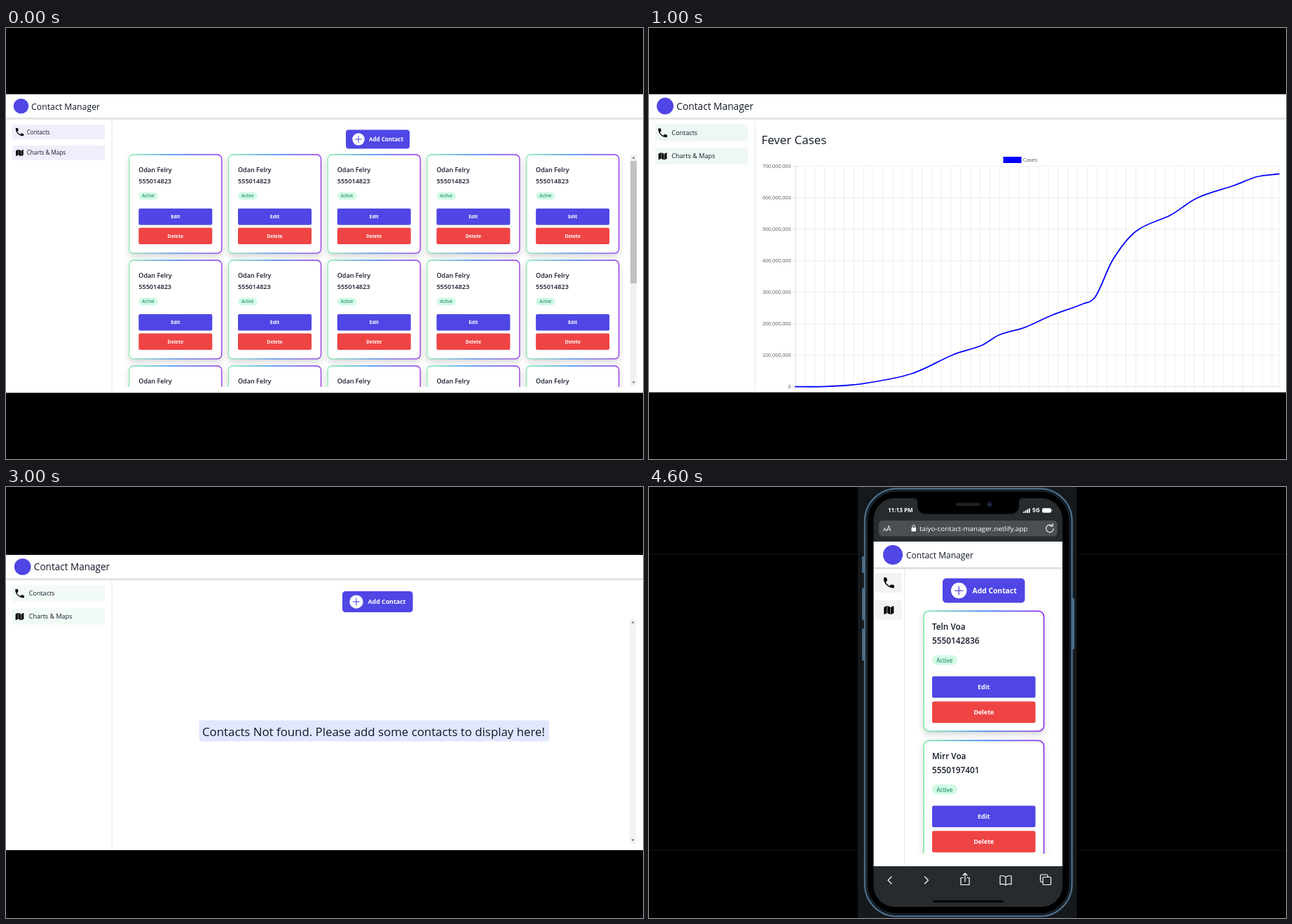
Recreate the animation shown at these times as an HTML page. Size 909 by 616 pixels, loop 5000 ms.

```html
<!DOCTYPE html>
<html lang="en">
<head>
<meta charset="utf-8">
<title>Contact Manager</title>
<style>
html, body { margin: 0; width: 100%; height: 100%; overflow: hidden; background: #000; }
#stage { display: block; width: 100%; height: 100%; }
text { font-family: "Open Sans", "Noto Sans", sans-serif; white-space: pre; }
.arial { font-family: "Liberation Sans", Arial, sans-serif; }
.place { font-family: "Noto Sans", "Noto Sans CJK SC", "DejaVu Sans", sans-serif;
  stroke: #fff; stroke-opacity: .7; stroke-width: 1.2px; paint-order: stroke; text-anchor: middle; }
.line { fill: none; stroke-linecap: round; stroke-linejoin: round; }
.card { filter: drop-shadow(0 4px 4px rgba(0, 0, 0, .16)); }
.popup { filter: drop-shadow(0 2px 4px rgba(0, 0, 0, .4)); }
</style>
</head>
<body>
<svg id="stage" viewBox="0 0 909 616">
  <defs>
    <linearGradient id="rim">
      <stop stop-color="#86efac"/><stop offset=".5" stop-color="#3b82f6"/><stop offset="1" stop-color="#9333ea"/>
    </linearGradient>
    <linearGradient id="shade" x2="0" y2="1">
      <stop stop-opacity=".2"/><stop offset="1" stop-opacity="0"/>
    </linearGradient>
    <path id="phone" d="M-5.4-1.2c1.4 2.8 3.8 5.1 6.600 6.600l2.200-2.200q.5-.4 1-.2 1.700.6 3.600.6 1 0 1 1V8q0 1-1 1A17 17 0 0 1-9-8q0-1 1-1h3.500q1 0 1 1 0 1.900.6 3.600.1.500-.3 1z"/>
    <path id="folded" d="M-10-6-4-9V6L-10 9ZM-3-9 3-6V9L-3 6ZM4-6 10-9V6L4 9Z"/>
    <g id="pin">
      <path d="M0 16.500 10 5Q16 0 13 6Q10 12 0 16.500Z" fill="#000" opacity=".2"/>
      <path d="M0 16.500C-1.500 10-7.200 5.500-7.200-.5A7.200 7.200 0 0 1 7.200-.5C7.200 5.500 1.500 10 0 16.500Z" fill="#2a81cb" stroke="#2e6c97" stroke-width=".6"/>
      <circle r="2.600" fill="#fff"/>
    </g>
  </defs>
</svg>
<script>
const INDIGO = '#4f46e5', INK = '#111827', LAND = '#f2efe9', SEA = '#aad3df';
const rect = (x, y, w, h, fill, r = 0, more = '') =>
  `<rect x="${x}" y="${y}" width="${w}" height="${h}" fill="${fill}" rx="${r}" ${more}/>`;
const disc = (x, y, r, fill) => `<circle cx="${x}" cy="${y}" r="${r}" fill="${fill}"/>`;
const text = (x, y, size, str, fill = INK, more = '') =>
  `<text x="${x}" y="${y}" font-size="${size}" fill="${fill}" ${more}>${str}</text>`;
const line = (d, stroke, w = 1) => `<path class="line" d="${d}" stroke="${stroke}" stroke-width="${w}"/>`;
const clip = (x, y, w, h, body) =>
  `<svg x="${x}" y="${y}" width="${w}" height="${h}" viewBox="${x} ${y} ${w} ${h}">${body}</svg>`;
const icon = (id, x, y, s) => `<use href="#${id}" transform="translate(${x} ${y}) scale(${s})"/>`;
const group = (x, y, s, body) => `<g transform="translate(${x} ${y}) scale(${s})">${body}</g>`;
const pairs = s => s.trim().split(/\s+/).map(p => p.split(',').map(Number));
const range = n => [...Array(n).keys()];
const bold = 'font-weight="700" ', semi = 'font-weight="600"', mid = 'text-anchor="middle"';

// Page frame at zoom s: header, two menu items and the sidebar edge
function shell(top, bottom, s, cx, tint) {
  const h = 21.2 * s, edge = top + 34;
  const item = (y, id, size, label) => rect(8.7, y, 132.5, h, tint, 3) +
    icon(id, 19.5, y + h / 2, size * s) + text(cx + 8.2 * s, y + h / 2 + 2.9 * s, 8.15 * s, label);
  return rect(0, top, 909, bottom - top, '#fff') + rect(0, edge, 909, 3, 'url(#shade)') +
    disc(cx, top + 17, 10.7 * s, INDIGO) + text(cx + 14.6 * s, top + 17 + 4.9 * s, 12.25 * s, 'Contact Manager') +
    item(top + 43.5, 'phone', .63, 'Contacts') + item(top + 43.5 + 29.7 * s, 'folded', .53, 'Charts &amp; Maps') +
    rect(150.6, edge + 1, 1, bottom - edge - 1, '#e5e7eb');
}

const addButton = (x, y, s) => group(x, y, s, rect(0, 0, 91, 27.2, INDIGO, 4) +
  disc(18, 13.6, 8.7, '#fff') + line('M13.5 13.6h9M18 9.1v9', INDIGO) +
  text(33, 16.6, 8, 'Add Contact', '#fff', bold));

function card(x, y, w, h, s, dx, dy, name, number) {
  const bw = (w - 2 * dx) / s;
  const button = (by, fill, label) => rect(0, by, bw, 23.5, fill, 2) +
    text(bw / 2, by + 14, 6.9, label, '#fff', bold + mid);
  return rect(x, y, w, h, '#fff', 6 * s, `class="card" stroke="url(#rim)" stroke-width="${1.3 * s}"`) +
    group(x + dx, y + dy, s, text(0, 0, 9.05, name, INK, semi) + text(0, 16, 9.1, number, INK, semi) +
      rect(0, 28.3, 27.6, 11, '#d1fae5', 5.5) + text(13.8, 36.2, 6.3, 'Active', '#047857', mid) +
      button(51.6, INDIGO, 'Edit') + button(79.3, '#ef4444', 'Delete'));
}

const scrollbar = (x, y, h, track) => rect(x, y, 9.5, h, track) +
  `<path d="M${x + 2.6} ${y + 6}h4.4l-2.2-2.6ZM${x + 2.6} ${y + h - 6}h4.4l-2.2 2.6Z" fill="#666"/>`;

function contacts() {
  const cards = range(15).map(i => card(175.8 + i % 5 * 141.7, 181 + Math.floor(i / 5) * 151,
    132, 140.8, 1, 13.5, 25.3, 'Odan Felry', '555014823')).join('');
  return shell(94.6, 521.4, 1, 21.5, '#f1edfb') + addButton(485, 145.4, 1) + clip(152, 176, 738, 337, cards) +
    scrollbar(890.7, 180.5, 331, '#f1f1f1') + rect(891, 190, 9, 175, '#c1c1c1');
}

// Chart of total cases: a smooth curve through its turning points
const totals = pairs(`209,512.7 250,512.4 303,508.6 375,494 435,466.5 475,453.5 500,438.5 535,428.4 575,410.5
  620,394 637,384 662,331 695,290.5 745,267 782,243 835,225 868,212.5 899,208.5`);

function smooth(pts) {
  const slope = i => {
    const a = pts[Math.max(0, i - 1)], b = pts[Math.min(pts.length - 1, i + 1)];
    return (b[1] - a[1]) / (b[0] - a[0]);
  };
  return 'M' + pts[0] + pts.slice(1).map(([x, y], i) => {
    const [px, py] = pts[i], d = (x - px) / 3;
    return `C${px + d} ${py + d * slope(i)} ${x - d} ${y - d * slope(i + 1)} ${x} ${y}`;
  }).join('');
}

function chart() {
  const grid = (d, first) => line(d, first ? '#d4d4d4' : '#e9e9e9', .8);
  const label = (x, y, str, more = '') =>
    text(x, y, 7.3, str, '#666', `class="arial" text-anchor="end" ${more}`);
  const rows = range(8).map(i => {
    const y = 512.7 - i * 45.02;
    return grid(`M204 ${y}H899`, !i) + label(202.5, y + 2.5, (i * 1e8).toLocaleString('en-US'));
  }).join('');
  const days = range(50).map(i => {
    const x = 209 + i * 13.88, day = new Date(Date.UTC(2020, 0, 22 + 23 * i));
    const date = [day.getUTCMonth() + 1, day.getUTCDate(), day.getUTCFullYear() % 100].join('/');
    return grid(`M${x} 197.5V517.5`, !i) + label(x + 2.5, 524.5, date, `transform="rotate(-50 ${x + 2.5} 524.5)"`);
  }).join('');
  return rows + days + grid('M899 197.5V513') + line(smooth(totals), '#00f', 1.8);
}

const charts = () => clip(0, 94, 909, 427, shell(94.6, 520.7, 1.12, 23, '#eef7f3') +
  text(160.5, 165.6, 16.9, 'Fever Cases') + rect(505.5, 184, 26, 9, '#00f') +
  text(533.7, 190.6, 7.2, 'Cases', '#666', 'class="arial"') + chart());

// Rough coasts as lon,lat in Mercator
const project = ([lon, lat]) => [319.9 + 3.41 * lon,
  429.6 - 195.4 * Math.log(Math.tan(Math.PI / 4 + lat * Math.PI / 360))].map(v => v.toFixed(1));
const trace = s => 'M' + pairs(s).map(project).join('L');

const mainlands = [
  `-9,37 -9,43 -1.5,43.5 -4.5,48.4 4,52 8,54 141,54 140,48 128,40 129,35 126,35 124,40 118,39 122,37 119,35 122,30
   116,23 106,20 109,12 105,9 101,13 100,7 104,1 98,9 97,16.5 91,22.5 87,21 80,15 77.5,8 73,20 67,25 57,26.5 48.5,30
   51.5,25 59.8,22.5 52,15.6 43.5,12.8 35,28.5 36,36.5 27,37 23.5,40 22.8,36.5 19.4,41 13.5,45.5 18.4,40 16,38
   8.5,44.3 3,43 -.5,38.5 -5.5,36`,
  `-6,35.8 10,37.2 11,33.5 20,31 36,31 34,27 39.5,15.5 43.5,11 51.2,11.8 42,-1 40.5,-15 35,-20 35,-26 14,-26
   13.5,-12 9,-1 9.5,4 4,6.2 -8,4.4 -17,14 -17,21 -10,30`,
  '113,-24 122,-18 129,-14.5 136,-12 136,-16 140,-17.5 142,-11 146,-19 151,-24',
  '-48,-1 -35,-6 -39,-14 -40,-26 -48,-26'
];
// Islands and inland seas are thick strokes, grouped by width
const islands = {
  5: ['142.5,47 142.5,53', '106,-7 114,-8', '9,39 9,42', '13,37.5 15,37.5', '121,23 121,24.5', '122,-9 126,-9'],
  7: ['131,32.5 136,35 140,36.5 143,43.5', '121,17 122,13 125,8', '120,-4 120.5,0 124,1', '80.7,7 81,7.6'],
  11: ['97,4 104,-4', '133,-2 140,-6 148,-9', '-4,51 0,53'],
  14: ['48,-15 46,-22'],
  22: ['112,0 116,4']
};
const seas = ['31,43.5 39,42.5', '50,44.5 52,39'];

// Pin clusters: x, y, radii and count, spread by the golden angle
const clusters = [[368, 250, 68, 42, 34], [350, 335, 75, 32, 8], [303, 398, 34, 18, 16], [378, 415, 32, 32, 11],
  [458, 415, 42, 42, 13], [450, 496, 75, 20, 12], [480, 317, 42, 42, 16], [690, 366, 56, 28, 10],
  [722, 441, 42, 26, 5], [887, 442, 28, 50, 5]];
const spread = ([x, y, rx, ry, n]) => range(n).map(i => {
  const r = ((i + .5) / n) ** .6, a = i * 2.4;
  return [x + rx * r * Math.cos(a), y + ry * r * Math.sin(a)].map(Math.round);
});
const lone = pairs(`246,381 309,491 328,436 518,452 560,250 577,425 590,367 604,412 686,261 686,309
  761,287 763,300 798,305 786,410 829,457`);
const pins = [...clusters.flatMap(spread), ...lone].sort((a, b) => a[1] - b[1]);

const places = `355,228,Deutschland 310,283,España 441,286,Türkiye 547,245,Қазақстан 520,287,Türkmenistan
  681,240,Монгол 657,301,中国 792,301,日本 322,331,Algérie 318,370,Mali 354,370,Niger 423,337,مصر
  690,376,Việt&#160;Nam 738,385,Philippines 723,416,Malaysia 730,439,Indonesia 823,452,Papua&#160;Niugini
  420,404,South&#160;Sudan 397,445,démocratique 385,472,Angola`.split(/\s+/).map(p => p.split(','));

function map() {
  const land = mainlands.map(s => `<path d="${trace(s)}Z" fill="${LAND}" stroke="${LAND}" stroke-linejoin="round" stroke-width="2"/>`).join('') +
    Object.entries(islands).flatMap(([w, list]) => list.map(s => line(trace(s), LAND, w))).join('') +
    seas.map(s => line(trace(s), SEA, 13)).join('');
  const popup = `<g class="popup"><path d="M574 350h18l-9 7.500Z" fill="#fff"/>${rect(530.5, 261.5, 104.5, 89.8, '#fff', 7)}</g>` +
    ['India', 'Active Cases: 1475', 'Recovered: 44463331', 'Deaths: 531926'].map((s, i) =>
      text(543, 277.3 + i * 20.4, 7.75, s, '#333', 'class="arial"')).join('') +
    line('M625.8 267.2l4 4m0-4l-4 4', '#757575', .9);
  const zoom = rect(167.5, 219.5, 19.5, 36.5, '#fff', 2, 'stroke="#000" stroke-opacity=".22"') +
    line('M168 237.8h18.5', '#ccc', .7) + line('M174 229h7M177.5 225.5v7M174 247h7', '#111', 1.3);
  const link = s => `<tspan fill="#0078a8">${s}</tspan>`;
  const credit = rect(760.5, 502.5, 140, 10.5, '#ffffffcc') +
    rect(763.3, 504.8, 7.2, 2.6, '#4c7be1') + rect(763.3, 507.4, 7.2, 2.6, '#ffd500') +
    text(772, 510, 7.2, `${link('Leaflet')} | © ${link('OpenStreetMap')} contributors`, '#333', 'class="arial"');
  return clip(161.5, 213, 738.5, 299.5, rect(161, 213, 740, 300, SEA) + land +
    places.map(([x, y, s]) => text(x, y, 6.2, s, '#86709a', 'class="place"')).join('') +
    pins.map(([x, y]) => icon('pin', x, y, 1)).join('') + popup + zoom + credit);
}

const maps = () => clip(0, 95, 909, 425, rect(0, 95, 909, 425, '#fff') +
  rect(150.7, 95, 1, 425, '#e5e7eb') + group(1, -375.6, 1, chart()) + text(161, 200, 17.1, 'Map') + map());

const empty = () => shell(97, 519, 1.107, 23.7, '#f2faf5') +
  addButton(480, 149, 1.105) + rect(275.5, 333.5, 499.5, 30, '#e0e7ff', 3) +
  text(280, 355.5, 16.83, 'Contacts Not found. Please add some contacts to display here!') +
  scrollbar(889.7, 188.5, 321, '#f3f3f0');

function mobile() {
  const steel = '#4b6c87', white = (d, w = 1.2) => line(d, '#fff', w);
  const entry = (y, name, number) => card(392, y, 171.5, 171.7, 1.3, 12, 26.2, name, number);
  const key = (x, y, h) => rect(x, y, 3, h, steel, 1);
  const body = rect(298, 0, 312.5, 616, '#15191c') +
    key(304, 99, 24) + key(304, 144, 46) + key(304, 202, 46) + key(604, 159, 73) +
    rect(308, 2.5, 295.5, 611, '#000', 46, `stroke="${steel}" stroke-width="2.5"`) +
    rect(311, 5.5, 289.5, 605, 'none', 43, 'stroke="#1b2730" stroke-width="2"') +
    rect(320.5, 16, 269.5, 584, '#262b2f', 30) +
    '<path d="M377 15.500q6 .5 6 6v4q0 13 13 13h119q13 0 13-13v-4q0-5.500 6-6Z"/>' +
    rect(438, 22.6, 34, 4.4, '#1f2123', 2.2) + disc(486, 25, 4.2, '#11162a') + disc(486, 25, 1.5, '#33446c');
  const status = text(341, 36, 8.1, '11:13 PM', '#fff', bold) +
    range(4).map(i => rect(534 + i * 2.6, 35 - i * 1.5, 1.9, 2 + i * 1.5, '#fff', .5)).join('') +
    text(547, 36.3, 8.3, '5G', '#fff', bold) + rect(561, 30.3, 13, 6.5, '#fff', 2) + rect(574.6, 32.3, 1, 2.5, '#aaa');
  const address = rect(328, 48, 254.5, 22.5, '#4b4f53', 5) + text(334, 62.5, 8, 'A', '#fff') + text(339, 62.5, 10, 'A', '#fff') +
    rect(374.5, 58, 6.5, 5.5, '#fff', 1) + white('M376 58v-1.5a1.8 1.8 0 0 1 3.6 0V58', 1) +
    text(386, 62.6, 9.85, 'taiyo-contact-manager.netlify.app', '#fff') +
    white('M575.6 55.6A5.3 5.3 0 1 0 577.2 59.5M572.2 56h3.9v-3.6', 1.1);
  const page = rect(320.5, 78, 269.5, 464, '#fff') + rect(320.5, 115, 269.5, 3.5, 'url(#shade)') +
    disc(348, 97, 14, INDIGO) + text(367, 101.6, 12, 'Contact Manager') + rect(364, 118, 1, 424, '#e5e7eb') +
    rect(323, 123, 38, 28, '#f3f3f4', 3) + rect(323, 162, 38, 28, '#f3f3f4', 3) +
    icon('phone', 342.3, 137, .83) + icon('folded', 342.3, 176, .7) +
    clip(320.5, 78, 269.5, 446, addButton(419, 130.5, 1.29) +
      entry(177.3, 'Teln Voa', '5550142836') + entry(362.3, 'Mirr Voa', '5550197401'));
  const tools = white('M346 557l-5 5 5 5M393.5 557l5 5-5 5') +
    white('M448 558.5h-3v10h12v-10h-3M451 564v-11.5M448 555l3-3 3 3') +
    white('M509 557.5q-4-3-8-1.5v12q4-1.5 8 1 4-2.5 8-1v-12q-4-1.5-8 1.5v11.5') +
    white('M561.5 564.5h-1.5q-1.5 0-1.5-1.5v-7.5q0-1.5 1.5-1.5h7.5q1.5 0 1.5 1.5v1') +
    rect(562, 557.5, 11.5, 11, 'none', 1.5, 'stroke="#fff" stroke-width="1.2"') + rect(405, 590.7, 101, 2.8, '#000', 1.4);
  return rect(0, 95.5, 909, 1, '#15151c') + rect(0, 518.7, 909, 1, '#131316') + body + status + address + page + tools;
}

const stage = document.getElementById('stage');
stage.insertAdjacentHTML('beforeend',
  [contacts, charts, maps, empty, mobile].map(scene => `<g class="scene">${scene()}</g>`).join(''));
const scenes = stage.querySelectorAll('.scene');

function draw() {
  const now = Math.floor(performance.now() % 5000 / 1000);
  scenes.forEach((scene, i) => scene.style.display = i === now ? '' : 'none');
  requestAnimationFrame(draw);
}
draw();
</script>
</body>
</html>
```
